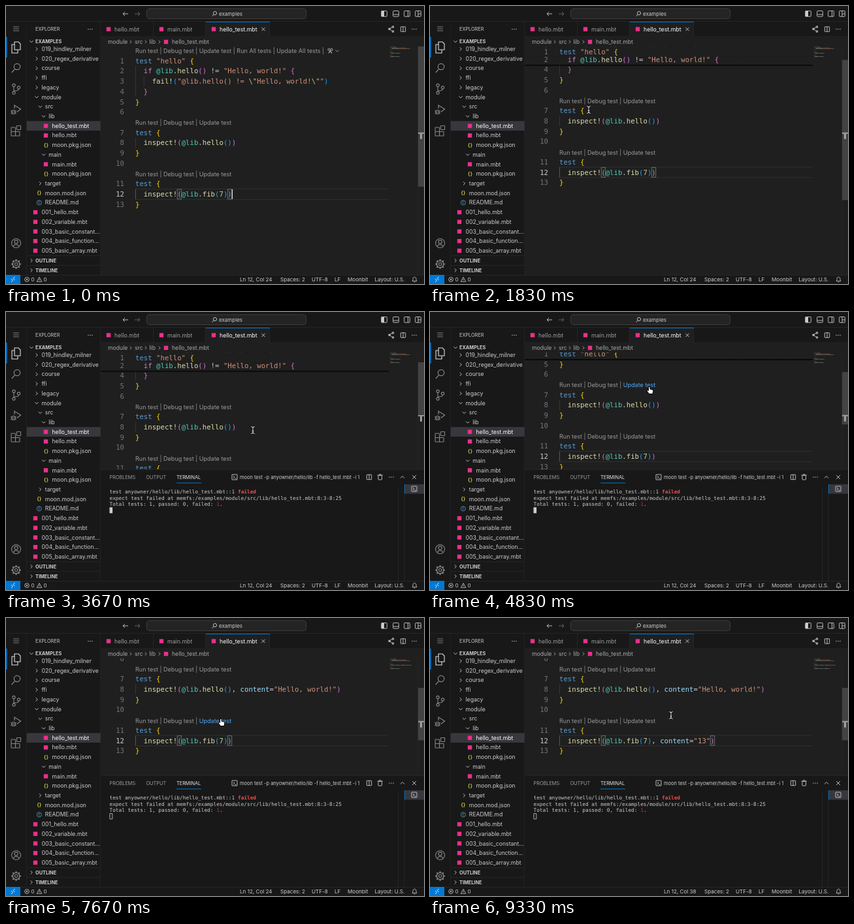
Animation of 640x426 px, one loop 9.5 s. Source, as an HTML page with a canvas:

```html
<!DOCTYPE html>
<html lang="en">
<head>
<meta charset="utf-8">
<title>Updating expect tests in the editor</title>
<style>
html, body { margin: 0; width: 100%; height: 100%; overflow: hidden; background: #181818; }
canvas { display: block; width: 640px; height: 426px; }
</style>
</head>
<body>
<canvas id="stage"></canvas>
<script>
const W = 640, H = 426, LOOP = 9500, STEP = LOOP / 57;
const canvas = document.getElementById('stage');
const ratio = window.devicePixelRatio || 1;
canvas.width = W * ratio;
canvas.height = H * ratio;
const g = canvas.getContext('2d');
g.scale(ratio, ratio);

const UI = 'Inter, sans-serif', MONO = '"DejaVu Sans Mono", monospace';
const BG = '#1f1f1f', SIDE = '#181818', EDGE = '#2b2b2b', FG = '#cccccc', DIM = '#9d9d9d', BLUE = '#0078d4';
const PINK = '#ec2f8c';
const CODE = 10.67, CHAR = 6.424, ROW = 15.72, CODE_X = 198, TOP = 62, FIRST = 84;
const COLORS = {
  k: '#569cd6', s: '#ce9178', e: '#d7ba7d', f: '#dcdcaa', m: '#4ec9b0', c: '#c586c0', n: '#b5cea8',
  v: '#9cdcfe', w: '#cccccc', 1: '#ffd700', 2: '#da70d6', 3: '#179fff'
};

// Times of the scripted actions, in ms.
const OPEN = 2500, RESULT = 3000, EDIT1 = 5700, EDIT2 = 8400;
const SCROLLS = [[1000, 1500], [3900, 4350], [6850, 7250]];
const SCROLL_STEP = 33.5;
const POINTER = [
  [600, 318, 262], [1300, 243, 159], [1950, 243, 159], [2200, 216, 149], [2900, 216, 149],
  [3500, 378, 181], [3900, 378, 181], [4600, 337, 120], [5800, 337, 120], [6300, 358, 151],
  [6850, 358, 151], [7450, 330, 160], [8500, 330, 160], [9100, 369, 149]
];

const ease = p => p * p * (3 - 2 * p);
const ramp = (t, a, b) => ease(Math.min(1, Math.max(0, (t - a) / (b - a))));

function rect(x, y, w, h, color) {
  g.fillStyle = color;
  g.fillRect(x, y, w, h);
}
function box(x, y, w, h, color, r = 0, lw = 1) {
  g.strokeStyle = color;
  g.lineWidth = lw;
  g.beginPath();
  g.roundRect(x, y, w, h, r);
  g.stroke();
}
function path(points, color, lw = 0.9, close = false) {
  g.beginPath();
  for (let i = 0; i < points.length; i += 2) g.lineTo(points[i], points[i + 1]);
  if (close) g.closePath();
  g.strokeStyle = color;
  g.lineWidth = lw;
  g.stroke();
}
function ring(x, y, r, color, lw = 1) {
  g.beginPath();
  g.arc(x, y, r, 0, 7);
  g.strokeStyle = color;
  g.lineWidth = lw;
  g.stroke();
}
function text(s, x, y, color = FG, size = 8.67, font = UI, weight = 400, align = 'left') {
  g.font = `${weight} ${size}px ${font}`;
  g.textAlign = align;
  g.fillStyle = color;
  g.fillText(s, x, y + size * 0.35);
  return g.measureText(s).width;
}
function chevron(x, y, dir, color = FG, r = 2.6) {
  g.save();
  g.translate(x, y);
  g.rotate({ right: 0, down: 1, up: -1 }[dir] * Math.PI / 2);
  path([-r / 2, -r, r / 2, 0, -r / 2, r], color);
  g.restore();
}
function cross(x, y, r = 2.6, color = FG) {
  path([x - r, y - r, x + r, y + r], color);
  path([x - r, y + r, x + r, y - r], color);
}
function dots(x, y, color = FG) {
  for (const d of [-3, 0, 3]) rect(x + d - 0.6, y - 0.6, 1.2, 1.2, color);
}
const badge = (x, y) => rect(x - 3.2, y - 3.2, 6.4, 6.4, PINK);
function splitIcon(x, y) {
  box(x - 3.7, y - 3.7, 7.4, 7.4, FG, 0.5, 0.9);
  path([x, y - 3.7, x, y + 3.7], FG);
}
function terminalIcon(x, y) {
  box(x - 4, y - 4, 8, 8, FG, 0.5, 0.9);
  path([x - 2, y - 2, x, y, x - 2, y + 2], FG);
  path([x + 0.4, y + 2.2, x + 2.5, y + 2.2], FG);
}

function titleBar() {
  rect(0, 0, W, 24, SIDE);
  for (const [x, d, color] of [[183, 1, FG], [201, -1, '#6b6b6b']]) {
    path([x - 4, 12, x + 4, 12], color);
    path([x - d, 9, x - 4 * d, 12, x - d, 15], color);
  }
  g.fillStyle = '#242424';
  g.beginPath();
  g.roundRect(215.5, 4, 244, 15.5, 4);
  g.fill();
  box(215.5, 4, 244, 15.5, '#454545', 4, 0.8);
  ring(320, 11, 2.6, FG, 0.9);
  path([318, 13, 315.5, 15.7], FG);
  text('examples', 326, 12, FG, 8);
  for (const x of [579, 597, 614, 631]) box(x - 4.3, 7.5, 8.6, 8.6, FG, 0.8, 0.9);
  rect(575, 8, 4, 8, FG);
  path([593, 13, 601, 13], FG);
  path([615.5, 8, 615.5, 16], FG);
  path([631, 8, 631, 16], FG);
  path([631, 12, 635, 12], FG);
}

function activityBar() {
  const c = '#868686';
  rect(0, 24, 31, 388, SIDE);
  rect(0, 47, 1.5, 32, BLUE);
  for (const y of [32, 35, 38]) path([11, y, 20, y], c);
  const hot = '#e0e0e0';
  path([13, 55, 19, 55, 22, 58, 22, 67, 13, 67], hot, 1.1, true);
  path([13, 59, 9, 59, 9, 72, 18, 72, 18, 67], hot, 1.1);
  ring(17, 93, 4.7, c, 1.2);
  path([13.6, 96.6, 8.7, 102], c, 1.2);
  ring(12, 121.5, 2.1, c, 1.1);
  ring(12, 133, 2.1, c, 1.1);
  ring(19.5, 125, 2.1, c, 1.1);
  path([12, 123.6, 12, 130.9], c, 1.1);
  path([19.5, 127, 18, 129.5, 12, 130], c, 1.1);
  path([13, 157, 13, 152, 22.5, 158, 16.5, 162.5], c, 1.2);
  ring(11.5, 162.5, 3, c, 1.1);
  path([7, 160, 16, 165], c, 0.8);
  path([7, 165, 16, 160], c, 0.8);
  box(8, 186, 6.5, 6.5, c, 0.5, 1.1);
  box(8, 192.5, 6.5, 6.5, c, 0.5, 1.1);
  box(14.5, 192.5, 6.5, 6.5, c, 0.5, 1.1);
  box(16.5, 183.5, 6, 6, c, 0.5, 1.1);
  ring(15.5, 363.5, 7, c, 1.1);
  ring(15.5, 361.5, 2.6, c, 1.1);
  path([11, 368.5, 13, 365.8, 18, 365.8, 20, 368.5], c, 1.1);
  ring(15.5, 395.5, 2.2, c, 1.1);
  ring(15.5, 395.5, 5.2, c, 1.3);
  for (let i = 0; i < 8; i++) {
    const a = i * Math.PI / 4, x = Math.cos(a), y = Math.sin(a);
    path([15.5 + x * 5.2, 395.5 + y * 5.2, 15.5 + x * 7.4, 395.5 + y * 7.4], c, 2);
  }
  rect(31, 24, 0.7, 388, EDGE);
}

// Each entry: kind, indent level, label.
const TREE = [
  ['right', 0, '019_hindley_milner'], ['right', 0, '020_regex_derivative'], ['right', 0, 'course'],
  ['right', 0, 'ffi'], ['right', 0, 'legacy'], ['down', 0, 'module'], ['down', 1, 'src'], ['down', 2, 'lib'],
  ['mbt', 3, 'hello_test.mbt'], ['mbt', 3, 'hello.mbt'], ['json', 3, 'moon.pkg.json'], ['down', 2, 'main'],
  ['mbt', 3, 'main.mbt'], ['json', 3, 'moon.pkg.json'], ['right', 1, 'target'], ['json', 1, 'moon.mod.json'],
  ['info', 1, 'README.md'], ['mbt', 0, '001_hello.mbt'], ['mbt', 0, '002_variable.mbt'],
  ['mbt', 0, '003_basic_constant...'], ['mbt', 0, '004_basic_function...'], ['mbt', 0, '005_basic_array.mbt']
];
function sideBar() {
  rect(31.7, 24, 113.3, 388, SIDE);
  TREE.forEach(([kind, level, label], i) => {
    const y = 66 + i * 14.71, x = 54.5 + level * 5.33;
    if (i === 8) rect(31.7, y - 7.35, 113.3, 14.7, '#37373d');
    if (kind === 'mbt') badge(x - 9.5, y);
    else if (kind === 'json') text('{}', x - 9, y, '#cbcb41', 8, UI, 600, 'center');
    else if (kind === 'info') {
      ring(x - 9, y, 3.5, '#519aba', 0.9);
      text('i', x - 9, y, '#519aba', 5.5, UI, 700, 'center');
    } else chevron(x - 7.5, y, kind);
    text(label, x, y, i === 8 ? '#ffffff' : FG);
  });
  rect(31.7, 24, 113.3, 37, SIDE);
  text('EXPLORER', 45, 35.5, FG, 7.33);
  dots(129, 35.5);
  [['EXAMPLES', 54.5, 'down'], ['OUTLINE', 390, 'right'], ['TIMELINE', 405, 'right']].forEach(([label, y, dir], i) => {
    if (i) rect(31.7, y - 7.6, 113.3, 0.7, EDGE);
    chevron(39, y, dir);
    text(label, 45, y, FG, 7.33, UI, 700);
  });
  rect(144.5, 24, 0.7, 388, EDGE);
}

function tabs() {
  rect(145, 24, 495, 23.3, SIDE);
  rect(145, 46.6, 495, 0.7, EDGE);
  for (const [x, w, label] of [[145, 81, 'hello.mbt'], [226, 80, 'main.mbt'], [306, 98, 'hello_test.mbt']]) {
    const active = x === 306;
    if (active) {
      rect(x, 24, w, 24, BG);
      rect(x, 24, w, 1, BLUE);
      cross(394, 35.5);
    }
    badge(x + 12, 35.5);
    text(label, x + 21, 35.5, active ? '#ffffff' : DIM, 8.75);
    rect(x + w - 0.7, 24, 0.7, 23, EDGE);
  }
  path([592, 32, 587, 35, 592, 39], FG);
  for (const [x, y] of [[592.5, 32], [587, 35.3], [592.5, 39]]) ring(x, y, 1.2, FG, 1.1);
  splitIcon(608, 35.5);
  dots(625, 35.5);
  rect(145, 47.3, 495, TOP - 47.3, BG);
  text('module', 156, 55, '#a9a9a9');
  text('src', 197, 55, '#a9a9a9');
  text('lib', 219.5, 55, '#a9a9a9');
  for (const x of [191, 214, 235]) chevron(x, 55, 'right', '#a9a9a9', 2.3);
  badge(245, 55);
  text('hello_test.mbt', 254, 55, '#a9a9a9');
}

// Rows of the document; null rows are code lenses. Tokens alternate colour key and text.
function documentRows(t) {
  const hello = t >= EDIT1 ? ['w', ', ', 'v', 'content', 'w', '=', 's', '"Hello, world!"'] : [];
  const fib = t >= EDIT2 ? ['w', ', ', 'v', 'content', 'w', '=', 's', '"13"'] : [];
  const call = name => ['w', '  ', 'f', 'inspect!', 2, '(', 'm', '@lib', 'w', '.', 'f', name, 3, '('];
  const open = ['k', 'test ', 1, '{'], close = [1, '}'];
  return [
    ['k', 'test ', 's', '"hello" ', 1, '{'],
    ['w', '  ', 'c', 'if ', 'm', '@lib', 'w', '.', 'f', 'hello', 2, '()', 'w', ' != ', 's', '"Hello, world!" ', 2, '{'],
    ['w', '    ', 'f', 'fail!', 3, '(', 's', '"@lib.hello() != ', 'e', '\\"', 's', 'Hello, world!', 'e', '\\"', 's', '"', 3, ')'],
    ['w', '  ', 2, '}'], close, [], null,
    open, [...call('hello'), 3, ')', ...hello, 2, ')'], close, [], null,
    open, [...call('fib'), 'n', '7', 3, ')', ...fib, 2, ')'], close
  ];
}
function eachToken(tokens, visit) {
  let col = 0;
  for (let i = 0; i < tokens.length; i += 2) {
    visit(tokens[i + 1], col, COLORS[tokens[i]]);
    col += tokens[i + 1].length;
  }
}
function codeLine(tokens, number, y) {
  text(number, 181, y, number === 12 ? FG : '#6e7681', CODE, MONO, 400, 'right');
  eachToken(tokens, (s, col, color) => text(s, CODE_X + col * CHAR, y, color, CODE, MONO));
}
function lens(y, extra, hover) {
  const parts = ['Run test', 'Debug test', 'Update test'];
  if (extra) parts.push('Run All tests', 'Update All tests');
  let x = CODE_X;
  parts.forEach((s, i) => {
    if (i) x += text(' | ', x, y, '#999999', 9.05);
    x += text(s, x, y, s === hover ? '#4daafc' : '#999999', 9.05);
  });
  if (!extra) return;
  text(' | ', x, y, '#999999', 9.05);
  ring(494.5, y - 2, 1.6, '#b0b0b0');
  ring(498.5, y - 2, 1.6, '#b0b0b0');
  path([494, y + 3.5, 496.5, y, 499, y + 3.5], '#b0b0b0', 1.2);
  chevron(507, y, 'down', '#999999');
}

function caretOn(t) {
  const start = t >= EDIT2 ? EDIT2 : t >= EDIT1 ? EDIT1 : 0;
  return Math.floor((t - start) / 500) % 2 === 0;
}
function hoveredLens(t) {
  if (t >= 2150 && t < 3000) return [6, 'Run test'];
  if (t >= 4500 && t < 5900) return [6, 'Update test'];
  if (t >= 7400 && t < 8600) return [11, 'Update test'];
  return [];
}

function editor(t) {
  const bottom = t >= OPEN ? 241 : 412;
  const focused = t < OPEN || t >= EDIT1;
  const scroll = SCROLL_STEP * SCROLLS.reduce((sum, [a, b]) => sum + ramp(t, a, b), 0);
  const rows = documentRows(t), rowY = i => FIRST + i * ROW - scroll;
  const [hoverRow, hoverText] = hoveredLens(t);
  g.save();
  g.beginPath();
  g.rect(145, TOP, 495, bottom - TOP);
  g.clip();
  rect(145, TOP, 495, bottom - TOP, BG);

  const cy = rowY(13);
  path([CODE_X, cy - 8, 585, cy - 8], '#303030', 1);
  path([CODE_X, cy + 8, 585, cy + 8], '#303030', 1);
  for (const i of [1, 2, 3, 8, 13]) {
    rect(CODE_X, rowY(i) - ROW / 2, 0.7, ROW, i === 13 ? '#707070' : '#404040');
  }
  rect(CODE_X + 2 * CHAR, rowY(2) - ROW / 2, 0.7, ROW, '#404040');

  const lastCol = rows[13].filter((_, i) => i % 2).join('').length;
  if (focused) {
    for (const col of [10, lastCol - 1]) {
      rect(CODE_X + col * CHAR, cy - 7.5, CHAR, 15, '#1d2b22');
      box(CODE_X + col * CHAR, cy - 7.5, CHAR, 15, '#888888', 0, 0.7);
    }
  }
  let number = 0;
  lens(rowY(-1) + 0.5, true);
  rows.forEach((tokens, i) => {
    if (tokens) codeLine(tokens, ++number, rowY(i));
    else lens(rowY(i) + 1, false, hoverRow === i ? hoverText : '');
  });
  if (focused && caretOn(t)) rect(CODE_X + lastCol * CHAR, cy - 7.5, 1.3, 15, '#d8d8d8');

  stickyLines(rows, rowY);
  minimap(rows);
  scrollBar(bottom, scroll);
  g.restore();
}

// Enclosing block headers stay pinned until the end of their block pushes them out.
function stickyLines(rows, rowY) {
  const pinned = [];
  [[0, 70, 4], [1, 70 + ROW, 3]].forEach(([i, slot, end]) => {
    const y = Math.min(slot, rowY(end) - ROW);
    if (rowY(i) < slot && y > TOP - 8) pinned.unshift([i, y]);
  });
  if (!pinned.length) return;
  const edge = Math.max(...pinned.map(p => p[1])) + ROW / 2;
  const shade = g.createLinearGradient(0, edge, 0, edge + 3);
  shade.addColorStop(0, '#000000');
  shade.addColorStop(1, 'rgba(0,0,0,0)');
  rect(145, edge, 441, 3, shade);
  for (const [i, y] of pinned) {
    rect(145, y - ROW / 2, 441, ROW, BG);
    codeLine(rows[i], i + 1, y);
  }
}

function minimap(rows) {
  g.globalAlpha = 0.5;
  let line = 0;
  for (const tokens of rows) {
    if (!tokens) continue;
    eachToken(tokens, (s, col, color) => {
      if (s.trim()) rect(588 + col * 0.67, 62.5 + line * 1.33, s.trimEnd().length * 0.67, 0.8, color);
    });
    line++;
  }
  g.globalAlpha = 1;
}

function scrollBar(bottom, scroll) {
  const view = bottom - TOP, total = 15 * ROW + view - ROW, k = view / total;
  rect(630.5, TOP, 0.7, view, EDGE);
  rect(631, TOP + scroll * k, 9, view * k, 'rgba(121,121,121,0.4)');
  const y = TOP + 218 * k;
  rect(631, y - 2, 9, 2, '#a0a0a0');
  rect(634, y, 3, 8, '#a0a0a0');
}

function panel(t) {
  if (t < OPEN) return;
  rect(145, 241, 495, 171, SIDE);
  rect(145, 241, 495, 0.7, EDGE);
  text('PROBLEMS', 158.5, 253, DIM, 7.33);
  text('OUTPUT', 214.5, 253, DIM, 7.33);
  text('TERMINAL', 261, 253, '#e7e7e7', 7.33);
  rect(261, 261.5, 38, 1, BLUE);
  terminalIcon(350, 253);
  text('moon test -p anyowner/hello/lib -f hello_test.mbt -i 1', 358, 253, FG, 7.45);
  splitIcon(556, 253);
  box(570, 250.5, 5.5, 6.5, FG, 0.8, 0.9);
  path([568.5, 250, 577, 250], FG);
  path([571.5, 248.6, 574, 248.6], FG);
  dots(590, 253);
  chevron(607, 253, 'up', FG, 3);
  cross(625, 253, 3);
  rect(600, 267, 0.7, 145, EDGE);
  rect(609.5, 264, 0.7, 148, EDGE);
  rect(610.2, 264, 29.8, 14.5, '#37373d');
  rect(610.2, 264, 0.8, 14.5, BLUE);
  terminalIcon(625, 271);

  const size = 7.77, x = 158.5;
  const print = (s, y, color = FG, col = 0, weight = 400) => text(s, x + col * size * 0.602, y, color, size, MONO, weight);
  const done = t >= RESULT;
  if (done) {
    print('test anyowner/hello/lib/hello_test.mbt::1', 275.3);
    print('failed', 275.3, '#f14c4c', 42, 700);
    print('expect test failed at memfs:/examples/module/src/lib/hello_test.mbt:8:3-8:25', 285);
    print('Total tests: 1, passed: 0, failed: ', 294.7);
    print('1', 294.7, '#cd3131', 35);
    print('.', 294.7, FG, 36);
  }
  const y = done ? 299.3 : 270.5;
  if (t < EDIT1) rect(x, y, 4.6, 9, FG);
  else box(x + 0.4, y + 0.4, 4, 8.3, FG, 0, 0.8);
}

function statusBar(t) {
  rect(0, 412, W, 14, SIDE);
  rect(0, 412, W, 0.7, EDGE);
  rect(0, 412, 22, 14, BLUE);
  path([8, 418, 10.5, 420.5, 8, 423], '#ffffff');
  path([13.5, 415, 11, 417.5, 13.5, 420], '#ffffff');
  ring(32, 419, 3.4, FG, 0.8);
  cross(32, 419, 1.4);
  text('0', 38.5, 419, FG, 8.1);
  path([51, 415.5, 54.8, 422.3, 47.2, 422.3], FG, 0.8, true);
  path([51, 418, 51, 420.5], FG, 0.8);
  text('0', 57.5, 419, FG, 8.1);
  const items = [
    [358, `Ln 12, Col ${t >= EDIT2 ? 38 : 24}`], [420, 'Spaces: 2'], [468, 'UTF-8'], [503, 'LF'],
    [523, 'Moonbit'], [564.5, 'Layout: U.S.']
  ];
  for (const [x, s] of items) text(s, x, 419, FG, 8.1);
  path([622, 421.5, 623, 420, 623, 417, 625.5, 415, 628, 417, 628, 420, 629, 421.5], FG, 0.8, true);
  path([624.5, 423, 626.5, 423], FG, 0.8);
}

function pointer(t) {
  if (t < POINTER[0][0]) return;
  let i = POINTER.length - 1;
  while (POINTER[i][0] > t) i--;
  const [t0, x0, y0] = POINTER[i], [t1, x1, y1] = POINTER[i + 1] || [t0 + 1, x0, y0];
  const p = ramp(t, t0, t1);
  g.save();
  g.translate(x0 + (x1 - x0) * p, y0 + (y1 - y0) * p);
  g.lineJoin = 'round';
  if (hoveredLens(t).length) {
    const hand = [-2, -5, -0.6, -5, -0.4, -1.4, 3.6, -0.4, 4.4, 0.8, 3.6, 5, -1.4, 5, -4.4, 1, -3.6, 0, -2, 1.2];
    path(hand, '#000000', 1.8, true);
    g.fillStyle = '#ffffff';
    g.fill();
  } else {
    for (const [color, lw] of [['#000000', 2.6], ['#e8e8e8', 1.1]]) {
      path([-2.6, -5.5, 0, -4.3, 2.6, -5.5], color, lw);
      path([0, -4.3, 0, 4.3], color, lw);
      path([-2.6, 5.5, 0, 4.3, 2.6, 5.5], color, lw);
      path([-1.3, 1.6, 1.3, 1.6], color, lw);
    }
  }
  g.restore();
}

function draw(t) {
  titleBar();
  activityBar();
  sideBar();
  tabs();
  editor(t);
  panel(t);
  statusBar(t);
  pointer(t);
  rect(0, 23.3, W, 0.7, EDGE);
  rect(306, 24, 98, 1, BLUE);
}

const start = performance.now();
function tick() {
  const now = (performance.now() - start) % LOOP;
  draw(Math.floor((now + 5) / STEP) % 57 * STEP);
  requestAnimationFrame(tick);
}
tick();
</script>
</body>
</html>
```
